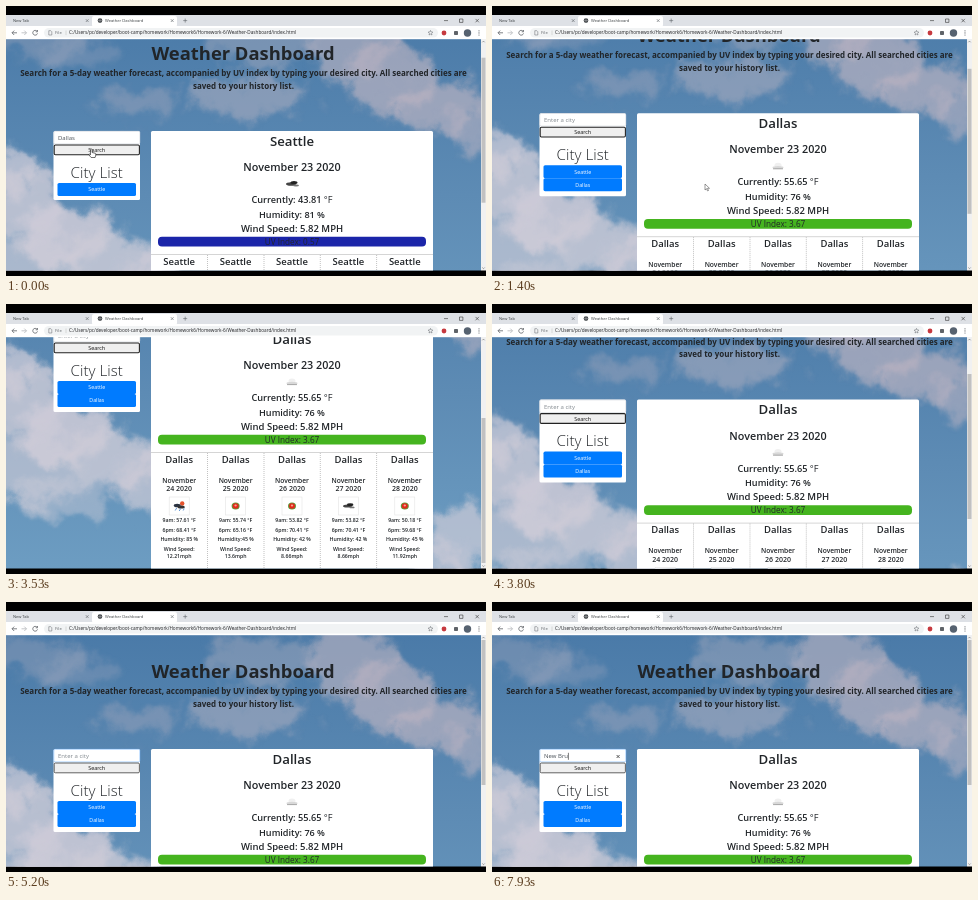
Recreate the animation shown at these times as an HTML page. Size 480 px wide and 270 px high, loop 8000 ms.

```html
<!DOCTYPE html>
<html lang="en">
<head>
<meta charset="utf-8">
<title>Weather Dashboard</title>
<style>
html, body { margin: 0; width: 100%; height: 100%; overflow: hidden; background: #000; }
svg { display: block; width: 100%; height: 100%; font-family: "Open Sans", "Noto Sans", sans-serif; }
</style>
</head>
<body>
<svg id="stage" viewBox="0 0 480 270"></svg>
<script>
const DARK = '#212529';

const rect = (x, y, w, h, fill, more = '') =>
  `<rect x="${x}" y="${y}" width="${w}" height="${h}" fill="${fill}" ${more}/>`;
const oval = (x, y, rx, ry, fill, more = '') =>
  `<ellipse cx="${x}" cy="${y}" rx="${rx}" ry="${ry}" fill="${fill}" ${more}/>`;
const line = (d, color, width = 0.8) =>
  `<path d="${d}" fill="none" stroke="${color}" stroke-width="${width}"/>`;
const text = (x, y, str, size, weight = 400, fill = DARK, anchor = 'middle', id = '') =>
  `<text x="${x}" y="${y}" font-size="${size}" font-weight="${weight}" fill="${fill}" text-anchor="${anchor}" id="${id}">${str}</text>`;
const left = (x, y, str, size, fill, id) => text(x, y, str, size, 400, fill, 'start', id);

// Sky: x, y, rx, ry, opacity in page coordinates
const clouds = [
  [25, 55, 50, 20, .3], [70, 68, 40, 14, .25], [132, 118, 40, 14, .35],
  [255, 58, 55, 26, .4], [247, 112, 60, 20, .5], [345, 60, 45, 34, .65],
  [385, 95, 45, 34, .7], [435, 120, 48, 26, .7], [462, 150, 22, 20, .6],
  [8, 185, 22, 22, .75], [18, 222, 40, 34, .8], [58, 250, 44, 32, .85],
  [105, 278, 44, 30, .8], [145, 302, 34, 28, .7], [25, 285, 50, 36, .65],
  [60, 316, 50, 18, .45], [456, 355, 32, 34, .7], [430, 385, 30, 22, .6]
];

const sky = rect(0, 30, 476, 360, 'url(#blue)') + '<g filter="url(#fluff)">' +
  clouds.map(([x, y, rx, ry, o]) => oval(x, y, rx, ry, y < 170 ? '#b9b3c1' : '#cfccd8', `opacity="${o}"`)).join('') + '</g>';

const darkCloud = (x, y, s = 1) =>
  oval(x - 1 * s, y, 5 * s, 1.8 * s, '#444') + oval(x + 2 * s, y - 1.5 * s, 3.5 * s, 1.6 * s, '#222') +
  oval(x + 4 * s, y + 1.6 * s, 3 * s, 1 * s, '#777');
const paleCloud = (x, y) =>
  oval(x, y - 1, 3.5, 2.5, '#f0f0f0') + oval(x, y + 1.2, 5.5, 1.5, '#d8d8d8') +
  line(`M${x - 5} ${y + 2.6}h10`, '#999');
const sun = (x, y) => oval(x, y, 4, 3.6, '#5d9c3a') + oval(x, y, 3, 2.7, '#e2281c') + oval(x, y - .4, 1.2, 1, '#f7a18d');
const rain = (x, y) =>
  oval(x + 3, y - 2.5, 2.2, 2.2, '#e5532d') + oval(x - 2, y - .5, 3.5, 1.8, '#2b3342') + oval(x + 2, y + 1, 3.6, 1.6, '#333') +
  line(`M${x - 4} ${y + 4.5}l1.5-2.5M${x} ${y + 5}l1.5-2.5M${x + 4} ${y + 4.5}l1-2`, '#3d7dc8');

const days = [
  [24, 57.61, 68.41, ': 85', 12.21, rain],
  [25, 55.74, 65.16, ':45', 13.6, sun],
  [26, 53.82, 70.41, ': 42', 8.66, sun],
  [27, 53.82, 70.41, ': 42', 8.66, (x, y) => darkCloud(x, y, .9)],
  [28, 50.18, 59.68, ': 45', 11.92, sun]
];

function dayCard(city, [date, am, pm, hum, wind, icon], i) {
  const x = 173.2 + i * 56.4;
  const small = (y, s) => text(x, y, s, 5.2, 600);
  return text(x, 280.5, city, 9.5, 600) +
    text(x, 300.5, 'November', 6.7, 600) + text(x, 309, date + ' 2020', 7, 600) +
    rect(x - 10, 315, 20, 18, '#fff', 'stroke="#e3e3e3" stroke-width=".6"') + icon(x, 324) +
    small(340, `9am: ${am.toFixed(2)} °F`) + small(350, `6pm: ${pm.toFixed(2)} °F`) +
    small(359, `Humidity${hum} %`) + small(369, 'Wind Speed:') + small(375.5, wind + 'mph');
}

const report = (id, city, temp, hum, uv, color, icon) => `<g id="${id}">` +
  text(286, 161.5, city, 13.2, 600) + text(286, 187, 'November 23 2020', 10.8, 600) + icon(286, 200) +
  text(286, 219.3, `Currently: ${temp} <tspan font-weight="400">°F</tspan>`, 9.2, 600) +
  text(286, 233.5, `Humidity: ${hum} %`, 9.1, 600) +
  text(286, 247.8, 'Wind Speed: 5.82 MPH', 9.5, 600) +
  rect(152, 252.7, 268, 9.8, color, 'rx="4"') + text(286, 260.6, 'UV Index: ' + uv, 8.2) +
  days.map((d, i) => dayCard(city, d, i)).join('') + '</g>';

const cityButton = (y, city) => rect(51.5, y, 78.5, 13, '#007bff', 'rx="1.6"') + text(90.8, y + 8.4, city, 5.3, 400, '#fff');

const page = '<g clip-path="url(#view)"><g id="page">' + sky +
  text(237, 76, 'Weather Dashboard', 18.4, 700) +
  text(237.5, 92.2, 'Search for a 5-day weather forecast, accompanied by UV index by typing your desired city. All searched cities are', 8, 700) +
  text(237.5, 104.8, 'saved to your history list.', 8, 700) +
  rect(47.5, 147, 86.5, 69, '#fff', 'id="panel" rx="1.5"') +
  rect(47.8, 147.3, 86, 12.6, '#fff', 'id="box" rx="1.5" stroke="#ced4da" stroke-width=".6"') +
  left(52, 156.2, '', 6, '#495057', 'field') +
  '<g id="typing">' + line('M0 150.8v7', '#222', .6) + '</g>' +
  '<g id="clear">' + line('M124.6 153l3 3m0-3l-3 3', '#333', .8) + '</g>' +
  rect(48.2, 161, 85.2, 9.8, '#efefef', 'id="search" rx="1.2" stroke="#222"') +
  text(90.7, 168, 'Search', 5.4, 400, '#111') +
  text(90.7, 193.5, 'City List', 15.2, 300) +
  cityButton(199, 'Seattle') + '<g id="second">' + cityButton(212, 'Dallas') + '</g>' +
  rect(145, 147, 282, 245, '#fff', 'rx="1.5"') +
  line('M145 270.5h282', '#aaa', .5) +
  `<path d="M201.5 271v120M258 271v120M314.3 271v120M370.6 271v120" stroke="#999" stroke-width=".6" stroke-dasharray="1 1"/>` +
  report('before', 'Seattle', 43.81, 81, '0.57', '#1b25a9', darkCloud) +
  report('after', 'Dallas', 55.65, 76, '3.67', '#45b41f', paleCloud) +
  '</g></g>';

const grey = '#5f6368';
const browser =
  rect(0, 9, 480, 11.5, '#dee1e6') + rect(86, 10, 85, 11, '#fff', 'rx="2"') + rect(0, 20, 480, 13.2, '#fff') +
  left(7, 16.2, 'New Tab', 4, '#3c4043') + left(99, 16.2, 'Weather Dashboard', 4.1, '#3c4043') +
  oval(94, 14.6, 2.3, 2.3, '#3c4043') + line('M91.8 14.6h4.4M94 12.4v4.4', '#cfd2d6', .4) +
  line('M79.8 13.2l2.8 2.8m0-2.8l-2.8 2.8M164.8 13.2l2.8 2.8m0-2.8l-2.8 2.8M177.2 14.6h4M179.2 12.6v4', grey, .6) +
  line('M438 14.6h4M453.5 13h3.4v3.4h-3.4zM469.5 12.9l3.4 3.4m0-3.4l-3.4 3.4', '#333', .6) +
  rect(38, 22, 394, 9.6, '#f1f3f4', 'rx="4.8"') +
  line('M11 26.8h-5m2.2-2.2l-2.2 2.2l2.2 2.2', grey) +
  line('M15.5 26.8h5m-2.2-2.2l2.2 2.2l-2.2 2.2', '#b5b8bc') +
  line('M31 25.2a2.4 2.4 0 1 0 .5 2.2M31.5 24v1.8h-1.8', grey) +
  line('M42.8 24.7h2l1 1v3.3h-3z', grey, .5) + left(49, 28.4, 'File', 4.3, grey) + line('M60 24.5v4.6', '#bbb', .5) +
  left(63, 28.4, 'C:/Users/pc/developer/boot-camp/homework/Homework6/Homework-6/Weather-Dashboard/index.html', 4.68, '#202124') +
  line('M424.5 24.4l.7 1.6 1.7.1-1.3 1.2.4 1.7-1.5-.9-1.5.9.4-1.7-1.3-1.2 1.7-.1z', grey, .5) +
  oval(438, 27, 2.4, 2.4, '#c6393f') + rect(448, 25, 4, 4, grey, 'rx=".8"') +
  oval(461.5, 27, 3.7, 3.7, '#566270') +
  [24.8, 26.9, 29].map(y => oval(473, y, .6, .6, grey)).join('');

document.getElementById('stage').innerHTML = `<defs>
  <linearGradient id="blue" x2="0" y2="1"><stop stop-color="#4a7aa8"/><stop offset=".5" stop-color="#5d8bb4"/><stop offset="1" stop-color="#6d9dc2"/></linearGradient>
  <filter id="fluff" filterUnits="userSpaceOnUse" x="-20" y="20" width="520" height="390" color-interpolation-filters="sRGB">
    <feGaussianBlur stdDeviation="5" result="soft"/>
    <feTurbulence type="fractalNoise" baseFrequency=".035" numOctaves="4" seed="4"/>
    <feDisplacementMap in="soft" scale="40" xChannelSelector="R" yChannelSelector="G"/>
  </filter>
  <clipPath id="view">${rect(0, 33, 475, 231.5, '#000')}</clipPath></defs>` +
  rect(0, 0, 480, 270, '#000') + page + browser +
  rect(475, 33, 5, 231.5, '#f1f1f1') + rect(475.5, 38, 4, 145, '#c1c1c1', 'id="thumb"') +
  line('M476.3 36.3l1.2-1.2 1.2 1.2M476.3 261.5l1.2 1.2 1.2-1.2', '#666', .6) +
  '<g id="hand"><path d="M-1 0q1-1 1.6 0v3l3.2.8q.8.3.5 1.8l-.7 2.4h-4l-2.4-3q.2-1 1.8.2z" fill="#fff" stroke="#111" stroke-width=".6"/></g>' +
  '<g id="arrow"><path d="M0 0v6l1.5-1.3 1 2.2 1-.4-1-2.2h2z" fill="#fff" stroke="#555" stroke-width=".6"/></g>';

const $ = id => document.getElementById(id);
const show = (id, on) => $(id).setAttribute('display', on ? 'inline' : 'none');
const move = (id, x, y) => $(id).setAttribute('transform', `translate(${x} ${y})`);
const ease = (t, from, to) => {
  const p = Math.min(1, Math.max(0, (t - from) / (to - from)));
  return p * p * (3 - 2 * p);
};

const LOADED = 400, FOCUS = 5030, TYPE = 7070, KEY = 115;

function draw(t) {
  const loaded = t >= LOADED, focus = t >= FOCUS;
  const scroll = 22 + 100 * ease(t, 1280, 1730) - 122 * ease(t, 3560, 3996);
  move('page', 0, -scroll);
  move('thumb', 0, scroll * 76 / 122);

  show('before', !loaded);
  show('after', loaded);
  show('second', loaded);
  $('panel').setAttribute('height', loaded ? 83 : 69);

  const typed = 'New Bru'.slice(0, Math.max(0, Math.floor((t - TYPE) / KEY) + 1));
  const value = loaded ? typed : 'Dallas';
  const field = $('field');
  field.textContent = value || 'Enter a city';
  field.setAttribute('fill', value ? '#495057' : '#7f868c');
  $('box').setAttribute('stroke', focus ? '#80bdff' : '#ced4da');
  $('search').setAttribute('stroke-width', focus ? .7 : 1.1);
  show('typing', typed);
  show('clear', typed);
  if (typed) move('typing', 52.4 + field.getComputedTextLength(), 0);

  const walk = ease(t, 450, 1250);
  show('hand', walk === 0);
  show('arrow', walk > 0 && t < 1730);
  move('hand', 85.5, 143.5);
  move('arrow', 85 + 128 * walk, 143 + 35 * walk);
}

(function frame() {
  draw(performance.now() % 8000);
  requestAnimationFrame(frame);
})();
</script>
</body>
</html>
```
